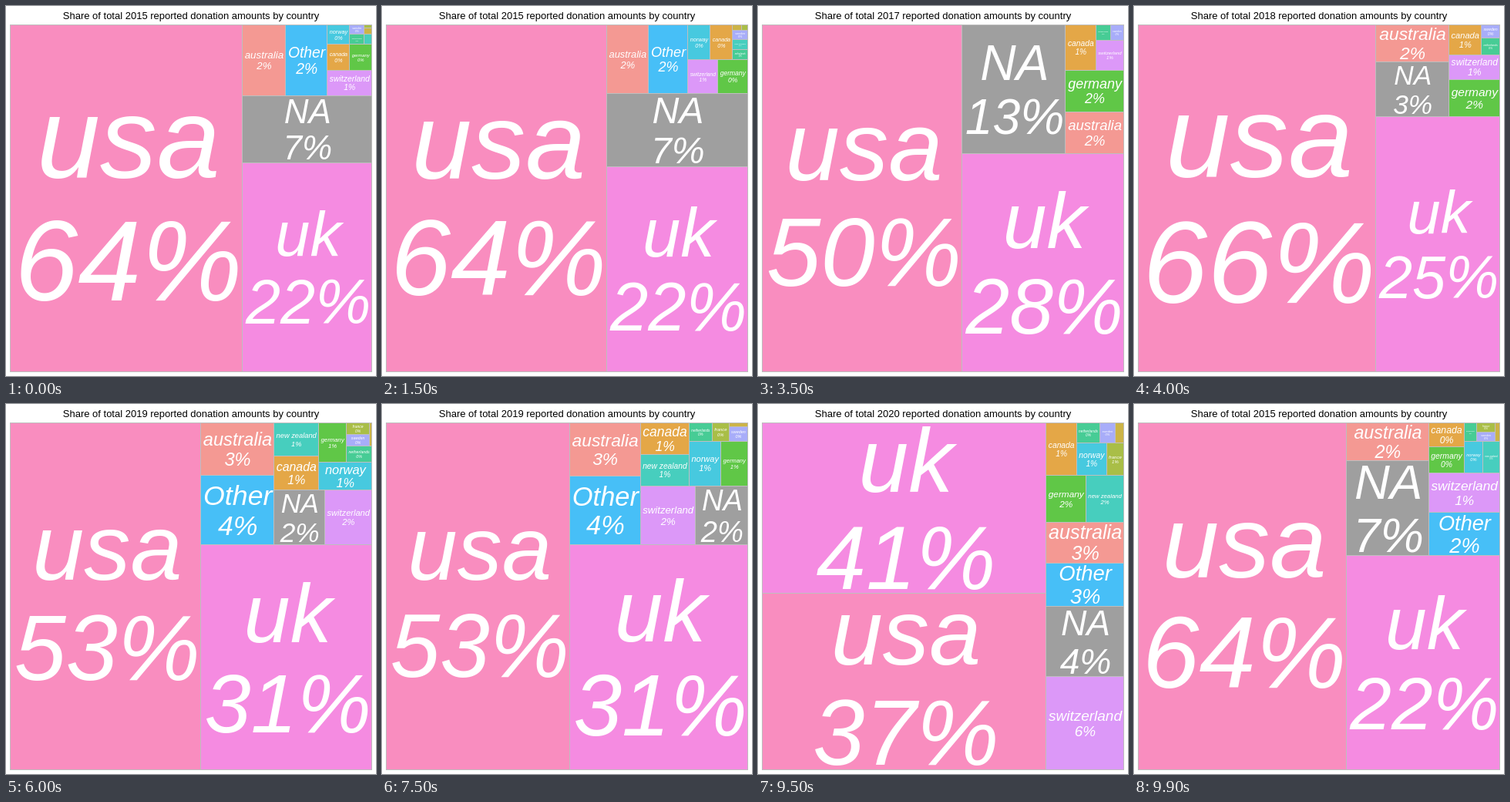
These frames come from a looping animation (480x480 px, 10 s). An HTML page:

```html
<!DOCTYPE html>
<html lang="en">
<head>
<meta charset="utf-8">
<title>Donations by country</title>
<style>
  html, body { margin: 0; width: 100%; height: 100%; overflow: hidden; background: #fff; }
  svg { display: block; width: 100vw; height: 100vh; }
  text { font-family: "Liberation Sans", Arial, sans-serif; font-kerning: none; text-anchor: middle; }
  .tile { stroke: #bebebe; stroke-width: 1; }
  .label { fill: #fff; font-style: italic; }
</style>
</head>
<body>
<svg viewBox="0 0 480 480">
  <g id="tiles"></g>
  <g id="labels"></g>
  <text id="title" x="240" y="17" font-size="13"></text>
</svg>
<script>
const YEARS = [2015, 2017, 2018, 2019, 2020];
const TOTALS = [6.7, 9.8, 16.1, 15, 10.7];

// name, base colour, share in percent for each year (0 = not listed)
const COUNTRIES = [
  ['usa', 'FF65AC', [64.18, 49.89, 65.67, 52.67, 36.91]],
  ['uk', 'F962DD', [21.57, 28.17, 25.25, 30.71, 40.7]],
  ['NA', '7F7F7F', [6.93, 12.7, 3.196, 2.22, 4.03]],
  ['australia', 'F8766D', [2.44, 1.804, 2.161, 3.061, 2.538]],
  ['Other', '00ACFC', [2.35, 1.478, 0, 4.051, 2.737]],
  ['switzerland', 'D575FE', [0.893, 0.531, 1, 2.052, 6.37]],
  ['canada', 'E18A00', [0.462, 1.16, 0.776, 1.2, 1.379]],
  ['germany', '24B700', [0.458, 1.996, 1.501, 0.87, 1.607]],
  ['norway', '00BBDA', [0.35, 1.57, 0, 1.177, 0.834]],
  ['netherlands', '00BE70', [0.117, 0.152, 0.25, 0.328, 0.409]],
  ['sweden', '8B93FF', [0.108, 0.15, 0.193, 0.214, 0.256]],
  ['new zealand', '00C1AB', [0.062, 0.315, 0, 1.19, 1.577]],
  ['denmark', 'BE9C00', [0.038, 0.044, 0, 0.043, 0.154]],
  ['france', '8CAB00', [0.02, 0.039, 0, 0.213, 0.503]]
];

const AREA = { x: 5.5, y: 24.5, w: 469, h: 450 };
// label metrics in em, except PAD and MIN_SIZE in px
const PAD = 2.835, LEAD = 1.08, CAP = 0.716, LINE_BOX = 1.85, SHIFT = 0.02, MIN_SIZE = 1.8;
const HOLD = 1500, STEP = 100, STEPS = 6, PERIOD = 2000;

const pen = document.createElement('canvas').getContext('2d');
pen.font = 'italic 100px "Liberation Sans", Arial, sans-serif';
pen.fontKerning = 'none';
const emWidth = s => pen.measureText(s).width / 100;

const $ = id => document.getElementById(id);
function add(parent, tag, cls) {
  const el = document.createElementNS('http://www.w3.org/2000/svg', tag);
  el.setAttribute('class', cls);
  return parent.appendChild(el);
}
function set(el, attrs) {
  for (const k in attrs) el.setAttribute(k, attrs[k]);
}

// 70% opaque over a light grey panel
function tint(hex) {
  const ch = [0, 2, 4].map(i => Math.round(0.7 * parseInt(hex.slice(i, i + 2), 16) + 70.5));
  return `rgb(${ch})`;
}

const tiles = COUNTRIES.map(([name, hex, shares]) => {
  const rect = add($('tiles'), 'rect', 'tile');
  rect.setAttribute('fill', tint(hex));
  const lines = [0, 1].map(() => add($('labels'), 'text', 'label'));
  lines[0].textContent = name;
  return { shares, rect, lines, nameWidth: emWidth(name) };
});

// Squarified treemap of the unit square, filled from the bottom left
function squarify(items) {
  const sum = items.reduce((s, d) => s + d.value, 0);
  const queue = items.map(d => ({ tile: d.tile, a: d.value / sum })).sort((p, q) => q.a - p.a);
  const out = [];
  let x = 0, y = 0, w = 1, h = 1;
  while (queue.length) {
    const side = Math.min(w, h);
    let n = 0, total = 0, best = Infinity;
    while (n < queue.length) {
      const next = total + queue[n].a, depth = next / side;
      const worst = Math.max(...queue.slice(0, n + 1).map(d => {
        const r = d.a / depth / depth;
        return Math.max(r, 1 / r);
      }));
      if (worst > best) break;
      best = worst;
      total = next;
      n++;
    }
    const depth = total / side;
    const column = h <= w;
    let at = column ? y : x;
    for (const { tile, a } of queue.splice(0, n)) {
      const len = a / depth;
      out.push(column ? { tile, x, y: at, w: depth, h: len } : { tile, x: at, y, w: len, h: depth });
      at += len;
    }
    if (column) { x += depth; w -= depth; } else { y += depth; h -= depth; }
  }
  return out;
}

const snap = v => Math.round(v - 0.5) + 0.5;

function drawTile({ tile, x, y, w, h }, year) {
  const left = AREA.x + x * AREA.w, right = left + w * AREA.w;
  const bottom = AREA.y + (1 - y) * AREA.h, top = bottom - h * AREA.h;
  const l = snap(left), t = snap(top);
  set(tile.rect, { x: l, y: t, width: snap(right) - l, height: snap(bottom) - t, visibility: 'visible' });

  const share = Math.round(tile.shares[year]) + '%';
  const size = Math.min(
    (right - left - 2 * PAD) / Math.max(tile.nameWidth, emWidth(share)),
    (bottom - top - 2 * PAD) / LINE_BOX);
  if (size < MIN_SIZE) return;
  const base = (top + bottom) / 2 + (LEAD + CAP) * size / 2;
  tile.lines[1].textContent = share;
  tile.lines.forEach((el, i) => set(el, {
    x: (left + right) / 2 + SHIFT * size,
    y: base - (1 - i) * LEAD * size,
    'font-size': size,
    visibility: 'visible'
  }));
}

function draw(from, k) {
  const to = (from + 1) % YEARS.length, p = k / STEPS;
  const year = p < 0.5 ? from : to;
  const items = [];
  for (const tile of tiles) {
    for (const el of [tile.rect, ...tile.lines]) el.setAttribute('visibility', 'hidden');
    const a = tile.shares[from] * TOTALS[from], b = tile.shares[to] * TOTALS[to];
    if (a && (b || !k)) items.push({ tile, value: a + (b - a) * p });
  }
  squarify(items).forEach(box => drawTile(box, year));
  $('title').textContent = `Share of total ${YEARS[year]} reported donation amounts by country`;
}

const start = performance.now();
let shown = '';
function frame(now) {
  const t = Math.max(0, now - start) % (PERIOD * YEARS.length);
  const from = Math.floor(t / PERIOD), phase = t % PERIOD;
  const k = phase < HOLD ? 0 : Math.floor((phase - HOLD) / STEP) + 1;
  const key = from + ':' + k;
  if (key !== shown) {
    shown = key;
    draw(from, k);
  }
  requestAnimationFrame(frame);
}
frame(start);
</script>
</body>
</html>
```
